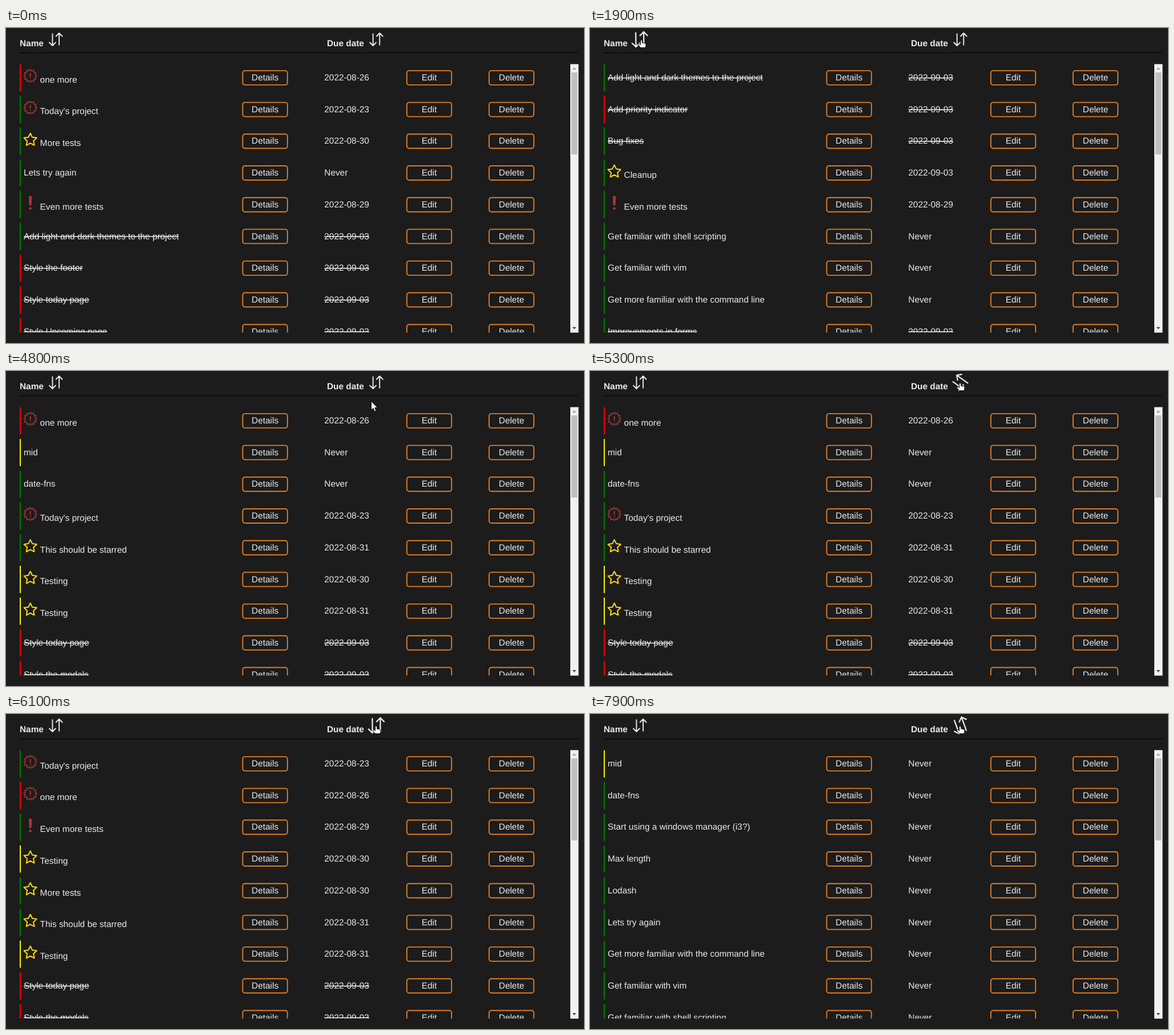
Write an HTML page that moves like this. It is 1012 by 553 pixels and loops after 8 s.

```html
<!DOCTYPE html>
<html lang="en">
<head>
<meta charset="utf-8">
<title>Task list sorting</title>
<style>
  html, body { margin: 0; width: 100%; height: 100%; overflow: hidden; background: #1c1c1c; }
  svg { display: block; }
  text { font: 15.37px "Liberation Sans", Arial, sans-serif; fill: #ebebeb; white-space: pre; text-rendering: geometricPrecision; }
  .head { font-weight: bold; }
  .mid { text-anchor: middle; }
  .done { text-decoration: line-through; }
  .line { fill: none; stroke-linecap: round; stroke-linejoin: round; }
  .button { fill: none; stroke: #e07c24; stroke-width: 1.92; }
</style>
</head>
<body>
<svg width="1012" height="553" viewBox="0 0 1012 553">
  <defs>
    <clipPath id="view"><rect x="24" y="63.5" width="978" height="471"/></clipPath>
    <path id="sort" class="line" stroke="#ebebeb" stroke-width="1.9"
      d="M-5.8-9.8V11M-11.3 5.5-5.8 11-.4 5.5M5.8 9.8V-11M.4-5.5 5.8-11 11.3-5.5"/>
  </defs>
  <rect width="1012" height="553" fill="#1c1c1c"/>
  <text class="head" x="24" y="32">Name</text>
  <text class="head" x="562" y="32">Due date</text>
  <path d="M24 43.5H1002" stroke="#000"/>
  <use href="#sort" id="nameSort"/>
  <use href="#sort" id="dueSort"/>
  <g clip-path="url(#view)">
    <g id="buttons"></g>
    <g id="rows"></g>
  </g>
  <rect x="988" y="63.4" width="14.4" height="471.4" fill="#f1f1f1"/>
  <rect x="990" y="78" width="10.4" height="144" fill="#c1c1c1"/>
  <path d="M991.5 73 995 69 998.5 73Z" fill="#a3a3a3"/>
  <path d="M991.5 525 995 529 998.5 525Z" fill="#505050"/>
  <g id="cursor" fill="#fff" stroke="#111" stroke-linejoin="round">
    <path id="arrow" d="M.5 0V15.5L4 12.3 6.5 18 9 17 6.6 11.4H11.3Z"/>
    <path id="hand" d="M-2.5-6Q-1-8 .5-6V-2L5.5-1Q7-.5 7 1.5L6 6.5H-2.5L-6.5 1.5Q-6.5-1-4.5-.2L-2.5 1.5Z"/>
  </g>
</svg>
<script>
const LOOP = 8000, TICK = 100, TURN = 300, PITCH = 55.7, ROWS = 9;
const NAME_X = 87.2, DUE_X = 648.4;
const $ = id => document.getElementById(id);
const BARS = { r: '#f00', g: '#008000', y: '#ff0' };

// bar colour, icon (b badge, s star, e exclamation), struck (x) | name | due date
const tasks = `rb-|one more|2022-08-26
gb-|Today's project|2022-08-23
gs-|More tests|2022-08-30
g--|Lets try again|Never
ge-|Even more tests|2022-08-29
g-x|Add light and dark themes to the project|2022-09-03
r-x|Style the footer|2022-09-03
r-x|Style today page|2022-09-03
r-x|Style Upcoming page|2022-09-03
r-x|Add priority indicator|2022-09-03
g-x|Bug fixes|2022-09-03
gs-|Cleanup|2022-09-03
g--|Get familiar with shell scripting|Never
g--|Get familiar with vim|Never
g--|Get more familiar with the command line|Never
g-x|Improvements in forms|2022-09-03
y--|mid|Never
g--|date-fns|Never
gs-|This should be starred|2022-08-31
ys-|Testing|2022-08-30
ys-|Testing|2022-08-31
r-x|Style the modals|2022-09-03
g--|Start using a windows manager (i3?)|Never
g--|Max length|Never
g--|Lodash|Never`.split('\n').map(line => {
  const [[bar, icon, struck], name, due] = line.split('|');
  return { bar, icon, name, due, cls: struck === 'x' ? 'done' : '' };
});

const sortBy = (list, key, dir) =>
  [...list].sort((a, b) => dir * ((a[key] > b[key]) - (a[key] < b[key])));

// Each click sorts the list left by the one before
const clicks = [[1700, 'name', 1], [4200, 'name', -1], [5800, 'due', 1], [7700, 'due', -1]];
const lists = [[0, tasks]];
for (const [time, key, dir] of clicks) lists.push([time, sortBy(lists.at(-1)[1], key, dir)]);

// Hover starts (1) and ends (0); a click redraws the icon and starts it over
const nameHover = [[-TURN, 0], [750, 1], [1620, 1], [4160, 0]];
const dueHover = [[-TURN, 0], [5165, 1], [5800, 1], [7700, 1]];
const path = [[450, 150, -14], [800, 91, 28], [4199, 91, 28], [4200, 326, 14], [4600, 616, 52], [4800, 639, 53], [5300, 649, 28]];

const at = (track, t) => track.findLast(step => step[0] <= t);
const easeOut = x => 1 - (1 - Math.min(x, 1)) ** 2;

function hover(track, t) {
  const [start, on] = at(track, t), p = easeOut((t - start) / TURN);
  return on ? p : 1 - p;
}

function pointer(t) {
  const next = path.findIndex(key => key[0] > t);
  if (next <= 0) return path.at(next).slice(1);
  const [t0, ...from] = path[next - 1], [t1, ...to] = path[next];
  const p = easeOut((t - t0) / (t1 - t0));
  return from.map((v, i) => v + (to[i] - v) * p);
}

const text = (x, y, s, cls = '') => `<text x="${x}" y="${y}" class="${cls}">${s}</text>`;

// Closed star outline alternating between two radii
function star(points, outer, inner) {
  const pts = Array.from({ length: points * 2 }, (_, i) => {
    const a = i * Math.PI / points, r = i % 2 ? inner : outer;
    return `${(r * Math.sin(a)).toFixed(2)} ${(-r * Math.cos(a)).toFixed(2)}`;
  });
  return `M${pts.join('L')}Z`;
}

const icons = {
  b: `<path class="line" stroke="#b03535" stroke-width="1.5" d="${star(12, 11.6, 8.7)}"/>
      <path class="line" stroke="#b03535" stroke-width="2" d="M0-4V.5M0 4.2V4.3"/>`,
  s: `<path class="line" stroke="#ffd90f" stroke-width="2" transform="translate(0 1)" d="${star(5, 11.7, 5.8)}"/>`,
  e: `<path fill="#b03535" d="M-2.6-9.5Q-2.6-12 0-12T2.6-9.5L2 3Q1.8 5 0 5T-2 3Z"/>
      <circle cy="10" r="2.2" fill="#b03535"/>`
};

function row({ bar, icon, name, due, cls }, i) {
  const art = icons[icon];
  return `<g transform="translate(0 ${i * PITCH})">
    <rect x="24" y="63.5" width="1.92" height="47.8" fill="${BARS[bar]}"/>
    ${art ? `<g transform="translate(42.6 84)">${art}</g>` : ''}
    ${art ? text(59.6, 95.8, name, cls) : text(31, 92, name, cls)}
    ${text(557.3, 92, due, cls)}</g>`;
}

const button = (x, label) =>
  `<rect class="button" x="${x - 39.2}" y="74.9" width="78.4" height="25" rx="4"/>${text(x, 92, label, 'mid')}`;

const buttons = button(453.6, 'Details') + button(741, 'Edit') + button(885, 'Delete');
for (let i = 0; i < ROWS; i++) $('buttons').innerHTML += `<g transform="translate(0 ${i * PITCH})">${buttons}</g>`;

function turn(el, x, p) {
  el.setAttribute('transform', `translate(${x} 20) rotate(${180 * p}) scale(${1 + .2 * p})`);
}

let shown;
function draw(now) {
  const t = Math.floor(now % LOOP / TICK) * TICK;
  const list = at(lists, t)[1];
  if (list !== shown) {
    shown = list;
    $('rows').innerHTML = list.slice(0, ROWS).map(row).join('');
  }
  turn($('nameSort'), NAME_X, hover(nameHover, t));
  turn($('dueSort'), DUE_X, hover(dueHover, t));

  const [x, y] = pointer(t);
  const hand = y < 30 && [NAME_X, DUE_X].some(cx => Math.abs(x - cx) < 12);
  $('cursor').setAttribute('transform', `translate(${x} ${y})`);
  $('cursor').style.display = t < path[0][0] ? 'none' : '';
  $('arrow').style.display = hand ? 'none' : '';
  $('hand').style.display = hand ? '' : 'none';
}

const start = performance.now();
function loop() {
  draw(performance.now() - start);
  requestAnimationFrame(loop);
}
loop();
</script>
</body>
</html>
```
